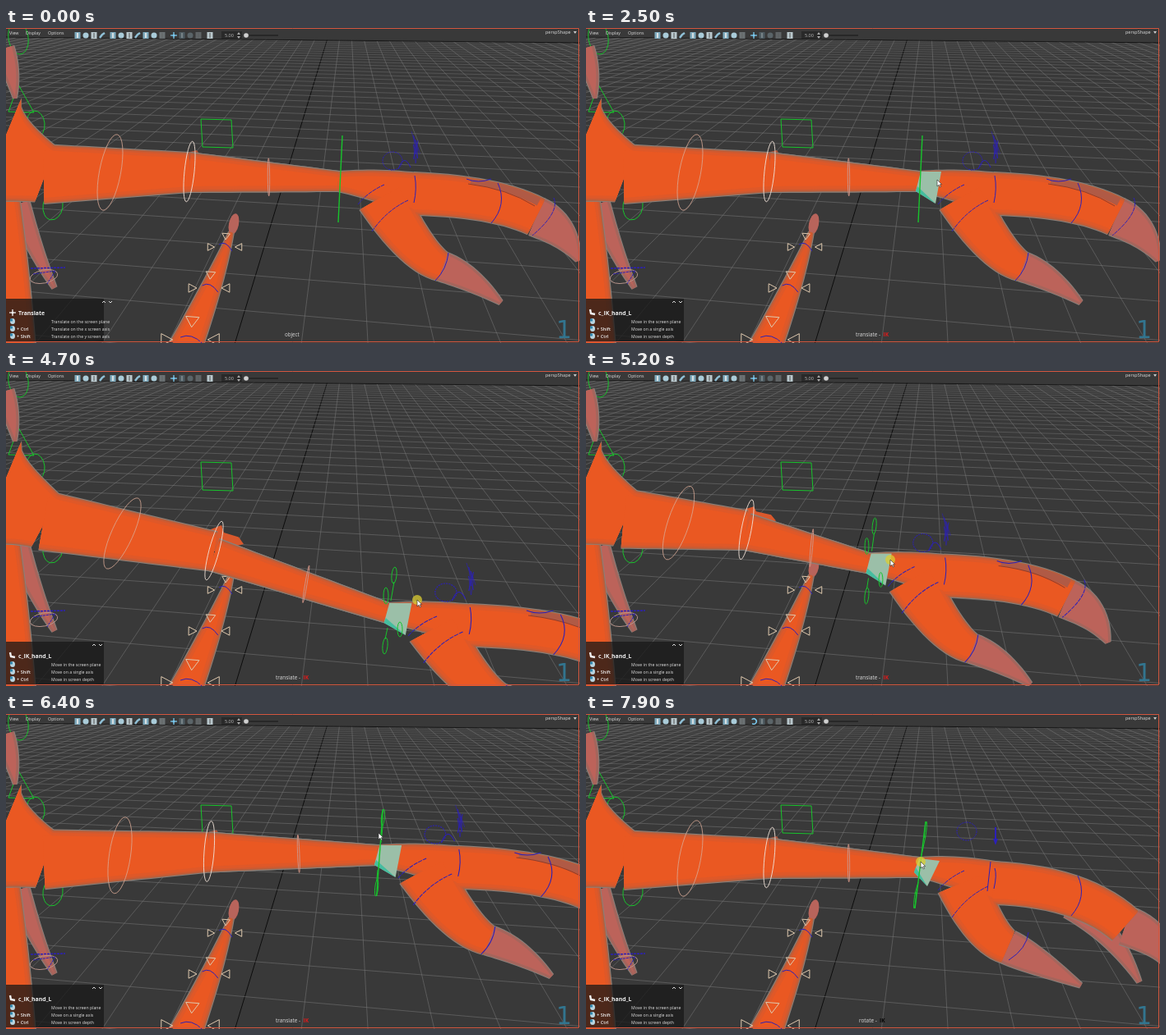
An HTML page with a canvas that plays this animation: 698x384 px, repeating every 8 s.

```html
<!DOCTYPE html>
<html lang="en">
<head>
<meta charset="utf-8">
<title>Rig viewport</title>
<style>
html, body { margin: 0; width: 100%; height: 100%; overflow: hidden; background: #393939; }
canvas { display: block; }
</style>
</head>
<body>
<canvas id="stage" width="698" height="384"></canvas>
<script>
const ctx = document.getElementById('stage').getContext('2d');
const W = 698, H = 384, LOOP = 8000, STEP = 100;
const GREEN = '#18c42c', BLUE = '#2c20b8';

// Growth of the outline and its colour, from the rim to the lit core.
const SKIN = [[1, '#88807b'], [0, '#b3603f'], [-1.5, '#d05a30'], [-3.5, '#df5828'], [-7, '#ea5822']];
const CLAW = [[1, '#88807b'], [0, '#a5655c'], [-3, '#bc635a']];

const lerp = (a, b, k) => a + (b - a) * k;
const clamp = k => Math.min(1, Math.max(0, k));
const ease = k => { k = clamp(k); return k * k * (3 - 2 * k); };

function trace(p, closed) {
  ctx.beginPath();
  for (let i = 0; i < p.length; i += 2) ctx.lineTo(p[i], p[i + 1]);
  if (closed) ctx.closePath();
}
function fill(p, color) {
  trace(p, true);
  ctx.fillStyle = color;
  ctx.fill();
}
function line(p, color, width = 1, closed = false) {
  trace(p, closed);
  ctx.strokeStyle = color;
  ctx.lineWidth = width;
  ctx.stroke();
}
function arc([x0, y0, cx, cy, x1, y1], color = BLUE, width = 1) {
  ctx.beginPath();
  ctx.moveTo(x0, y0);
  ctx.quadraticCurveTo(cx, cy, x1, y1);
  ctx.strokeStyle = color;
  ctx.lineWidth = width;
  ctx.stroke();
}
function oval(x, y, rx, ry, color, rot = 0, solid = false) {
  ctx.beginPath();
  ctx.ellipse(x, y, rx, ry, rot, 0, 7);
  ctx.lineWidth = 1;
  ctx.fillStyle = ctx.strokeStyle = color;
  solid ? ctx.fill() : ctx.stroke();
}
function text(s, x, y, size, color = '#ddd', weight = 400) {
  ctx.font = `${weight} ${size}px "Open Sans", sans-serif`;
  ctx.fillStyle = color;
  ctx.fillText(s, x, y);
}

// A limb: a quadratic spine whose half-width runs from w0 to w1.
const limb = (spine, w0, w1, power = 1) => ({ spine, w0, w1, power });
const bone = (x0, y0, x1, y1, w0, w1) => limb([x0, y0, (x0 + x1) / 2, (y0 + y1) / 2, x1, y1], w0, w1);

function fillLimb({ spine: [x0, y0, cx, cy, x1, y1], w0, w1, power }, color, grow = 0) {
  const left = [], right = [];
  for (let i = 0; i <= 14; i++) {
    const t = i / 14;
    const x = lerp(lerp(x0, cx, t), lerp(cx, x1, t), t);
    const y = lerp(lerp(y0, cy, t), lerp(cy, y1, t), t);
    const dx = lerp(cx - x0, x1 - cx, t), dy = lerp(cy - y0, y1 - cy, t);
    const k = Math.max(0, lerp(w0, w1, t ** power) + grow) / (Math.hypot(dx, dy) || 1);
    left.push(x + dy * k, y - dx * k);
    right.unshift(x - dy * k, y + dx * k);
  }
  fill([...left, ...right], color);
}
// Layer by layer over all limbs, so that joints show no seams.
function paint(limbs, layers) {
  for (const [grow, color] of layers) for (const l of limbs) fillLimb(l, color, grow);
}

// time, wrist x y, pointer x y
const KEYS = [
  [100, 416, 190, 640, 300],
  [900, 416, 190, 427, 185],
  [2700, 416, 190, 427, 185],
  [3800, 543, 192, 531, 187],
  [4700, 476, 298, 500, 279],
  [5700, 235, 177, 240, 181],
  [6400, 464, 175, 453, 145],
  [7000, 416, 190, 407, 180],
  [8000, 416, 190, 407, 180]
];
function poseAt(t) {
  let i = 0;
  while (i < KEYS.length - 2 && t >= KEYS[i + 1][0]) i++;
  const a = KEYS[i], b = KEYS[i + 1], k = ease((t - a[0]) / (b[0] - a[0]));
  const [, x, y, px, py] = a.map((v, n) => lerp(v, b[n], k));
  // The elbow sits halfway to the wrist until the arm is too short and folds.
  const mid = (30 + x) / 2, slack = Math.max(0, 195 - mid), fold = slack / 62;
  const bump = clamp((y - 195) / 100);
  return {
    x, y, px, py, fold, bump,
    ex: mid + slack,
    ey: (178 + y) / 2 - 8 - slack * .53 - bump * 10,
    loops: clamp(Math.hypot(x - 416, y - 190) / 110),
    matrix: [1 + Math.max(0, x - 416) * .0015 + .03 * fold, 0, -.24 * fold, 1 - .05 * fold, x, y]
  };
}

function drawGrid() {
  ctx.fillStyle = '#393939';
  ctx.fillRect(0, 0, W, H);
  const horizon = -70, cell = .178, top = 12;
  ctx.save();
  trace([0, 10, W, 18, W, H, 0, H], true);
  ctx.clip();
  for (let i = -36; i <= 32; i++) {
    const x = y => 416 + (i * cell - .303) * (y - horizon);
    line([x(top), top, x(H), H], i ? 'rgba(125,125,125,.5)' : '#0c0c0c');
  }
  // Rows are evenly spaced in depth, so their screen height follows 1 / depth.
  for (let n = 0; n < 58; n++) {
    const drop = 1 / (1 / 480 + n * cell / 640);
    const at = x => horizon + drop * (1 + (x - 391) / 4800);
    if (at(391) > 13) line([0, at(0), W, at(W)], `rgba(125,125,125,${Math.min(.5, .24 + drop / 800)})`);
  }
  ctx.restore();
  line([0, 11, W, 18], '#161616');
}

function drawBackdrop() {
  oval(15, 12, 12, 20, GREEN, -.15);
  line([3, 102, 15, 69, 34, 103], GREEN, 1, true);
  oval(36, 117, 11, 16, GREEN, -.1);
  oval(57, 217, 12, 17, GREEN, .15);
  line([237, 111, 274, 112, 276, 146, 239, 145], GREEN, 1, true);
  paint([limb([-2, 25, 8, 55, 11, 86], 12, 2, 1.8), limb([16, 214, 30, 262, 59, 317], 13, 3, 1.6)], CLAW);
  paint([limb([0, 205, 10, 290, 16, 390], 16, 20)], SKIN);
  oval(46, 303, 17, 8, '#b5938a', -.2);
  ctx.setLineDash([3, 1]);
  line([30, 293, 72, 292], BLUE, 1.5);
  line([33, 300, 60, 296, 50, 312], BLUE);
  ctx.setLineDash([]);

  oval(277, 239, 6, 13, '#b8645b', .2, true);
  paint([limb([274, 249, 256, 305, 218, 390], 3, 20)], SKIN);
  // Control rings: arrows left, above and right of the tail, facing it.
  for (const [x, y, size] of [[266, 267, 1], [247, 317, 1.2], [224, 380, 1.7]]) {
    arc([x - 7 * size, y - 3, x + size, y - 9, x + 9 * size, y + 5]);
    for (const side of [0, 1.65, 3.14]) {
      const ax = x - Math.cos(side) * 18 * size, ay = y - Math.sin(side) * 14 * size;
      const corners = [0, 2.1, 4.2].flatMap(a =>
        [ax + 5.5 * size * Math.cos(side + a), ay + 5 * size * Math.sin(side + a)]);
      line(corners, '#dfc9ae', 1, true);
    }
  }
}

function drawArm({ ex, ey, x, y, matrix, bump, fold }) {
  const [a, , c, d] = matrix;
  const wx = x - 11 * a - 3 * c, wy = y - 3 * d, sy = 178 + (ey - 176) * .1;
  const elbow = 24 - 3 * fold;
  const forearm = bone(ex, ey + 4 * bump, wx, wy, elbow - 4 * bump, 12);
  if (fold < .5) {
    const lift = 5 * bump;
    fill([ex - 12 - lift, ey - 22, ex + 9, ey - 27 - lift, ex + 12, ey - 23, ex + 30, ey - 20 + lift / 2,
      ex + 36, ey - 14 + lift, ex, ey], bump > .4 ? '#d9582c' : '#ad563d');
  }
  paint([forearm], SKIN);
  if (fold > 0) fillLimb(forearm, `rgba(120,75,68,${.65 * fold})`, 1);
  paint([
    limb([-10, 155, 19, 167, 48, sy], 75, 36, .5),
    bone(46, sy, ex, ey, 36, elbow),
    ...(fold < .4 ? [forearm] : [])
  ], SKIN);

  const tilt = Math.atan2(ey - 178, ex - 30);
  oval((30 + ex) / 2, (176 + ey) / 2, 13, 47, 'rgba(218,170,150,.8)', .2 + tilt * 1.2);
  oval(ex, ey - 1, 6, 37, 'rgba(240,225,215,.9)', .11 + tilt * .8);
  if (fold < .4) oval(lerp(ex, wx, .53), lerp(ey, wy, .53), 1.2, 23, '#cf9384', tilt * .9);
}

function drawHand(twist, selected) {
  const to = (a, b) => lerp(a, b, twist);
  const tipX = to(645, 656), tipY = to(230, 258);
  const thumbX = to(531, 513), thumbY = to(291, 284), thumbW = to(18, 21);

  if (twist > .1) {
    ctx.globalAlpha = clamp(twist * 2);
    paint([limb([590, 232, 640, 262, 673, 327], 18, 3, 1.6)], CLAW);
    ctx.globalAlpha = 1;
  }
  paint([
    limb([tipX, tipY, to(680, 705), to(245, 275), to(696, 712), to(284, 315)], 24, 3, 1.8),
    limb([thumbX, thumbY, to(565, 545), to(303, 299), 602, to(335, 331)], thumbW, 3, 1.8)
  ], CLAW);
  paint([
    limb([404, 187, 450, 190, 503, to(203, 207)], 12, 26),
    limb([495, to(202, 206), to(595, 602), to(205, 210), tipX, tipY], 26, 24),
    limb([457, 206, to(500, 485), to(280, 272), thumbX, thumbY], 31, thumbW)
  ], SKIN);
  if (twist < .5) {
    fillLimb(limb([565, 187, 610, 193, 648, 212], 3, 5), '#b05a45');
    arc([562, 190, 610, 196, 643, 217], '#8e3d2c');
  }
  if (selected) {
    const x0 = 407 - 2 * twist, x1 = 432 - 2 * twist, x2 = 425 - 10 * twist, x3 = 401 - 2 * twist;
    const y0 = 175 + twist, y2 = 214 - 4 * twist, y3 = 199 - 6 * twist;
    fill([x0, y0, x1, y0 + 3 * twist, x2, y2, x3, y3], '#9bbfa8');
    fill([x3, y3, x3 + 2, y3 - 6, x2, y2], '#45bd9f');
  }

  const drop = twist * 8;
  arc([497, 180 + drop, 500, 196, 496, 213]);
  arc([598, 189 + drop, 610, 215 + drop, 590, 238 + drop]);
  arc([538, 274 - drop, 536, 294 - drop, 522 - drop, 308 - drop]);
  ctx.setLineDash([5, 1]);
  arc([428, 215, 440, 200, 460, 191]);
  arc([445, 248, 463, 222, 489, 210]);
  if (twist < .5) arc([666, 207, 674, 224, 640, 253]);
  ctx.setLineDash([2, 1]);
  oval(to(470, 463), to(162, 143), 12, 11, BLUE);
  ctx.setLineDash([]);
  if (twist < .5) {
    const spikes = [];
    for (let i = 0; i < 12; i++) spikes.push(493 + (i * 5) % 8 + i * .3, 126 + (i * 17) % 40);
    line(spikes, BLUE, .6);
    arc([477, 172, 484, 152, 492, 170]);
    arc([560, 184, 574, 190, 590, 184]);
  } else {
    line([498, 138, 498, 158], BLUE, 2);
    fill([495, 152, 501, 152, 498, 160], BLUE);
    line([492, 180, 488, 216], BLUE);
  }
}

function drawWristControl({ x, y, loops, fold }, twist) {
  const reach = 1 - .25 * fold, lean = twist * 4 + loops * 3;
  const top = [x - 7 + lean, y - 59 * reach], foot = [x - 12 - lean, y + 47 * reach];
  if (loops < .6) line([...top, ...foot], GREEN, 1.4);
  if (loops < .05 && twist < .1) return;
  const r = 1 + 2 * loops;
  oval(top[0], top[1] + 10, r, 10, GREEN, .1);
  oval(foot[0], foot[1] - 10, r, 10, GREEN, .1);
  line([top[0], top[1] + 18, x - 8, y - 18], GREEN);
  line([foot[0], foot[1] - 18, x - 12, y + 15], GREEN);
  if (loops > .5) {
    oval(x - 14, y - 24, r, 10, GREEN);
    oval(x + 3, y + 17, r, 9, GREEN);
  }
}

function drawCross(x, y, color) {
  line([x - 4, y, x + 4, y], color, 1.3);
  line([x, y - 4, x, y + 4], color, 1.3);
  oval(x, y, 1.5, 1.5, color, 0, true);
}

function drawIcon(x, kind) {
  if (kind === 1) oval(x, 9, 3.5, 3.5, '#a9cbd8', 0, true);
  else if (kind === 3) line([x - 3, 12, x, 8, x + 3, 6], '#8fc0d6', 2.5);
  else {
    ctx.fillStyle = kind ? '#b9c8cd' : '#7eaabd';
    ctx.fillRect(x - 3.5, 5, 7, 8);
    line([x, 6, x, 12], kind ? '#555' : '#d8e0e2', kind ? 1 : 2);
  }
}

function drawToolbar(rotating) {
  text('View', 4, 8, 5.3);
  text('Display', 24, 8, 5.3);
  text('Options', 51, 8, 5.3);
  text('perspShape', 656, 7, 5.5);
  fill([690, 4, 694, 4, 692, 7], '#ccc');
  // start, count, opacity
  for (const [start, count, alpha] of [[87, 4, 1], [130, 6, 1], [190, 1, .4], [214, 3, .3], [248, 1, 1]]) {
    ctx.globalAlpha = alpha;
    for (let i = 0; i < count; i++) drawIcon(start + i * 10, count === 1 ? 2 : i % 4);
  }
  ctx.globalAlpha = 1;
  if (rotating) {
    ctx.beginPath();
    ctx.arc(204, 9, 3.2, -2.4, 2.2);
    ctx.strokeStyle = '#79c8ed';
    ctx.lineWidth = 1.5;
    ctx.stroke();
  } else drawCross(204, 9, '#79c8ed');
  ctx.fillStyle = '#292929';
  ctx.fillRect(262, 4, 25, 9);
  text('5.00', 266, 11, 5.5, '#bbb');
  fill([281, 8, 285, 8, 283, 5], '#aaa');
  fill([281, 10, 285, 10, 283, 13], '#aaa');
  line([296, 9, 331, 9], '#222', 1.5);
  oval(292, 9, 2.8, 2.8, '#d0d0d0', 0, true);
}

function drawPanel(selected) {
  ctx.fillStyle = 'rgba(24,24,24,.74)';
  ctx.fillRect(0, 330, 119, 52);
  const x = selected ? 107 : 119;
  line([x - 2, 335, x, 333, x + 2, 335], '#ddd');
  line([x + 6, 333, x + 8, 335, x + 10, 333], '#ddd');
  if (selected) line([5, 343, 6, 348, 11, 349], '#eee', 2.4);
  else drawCross(8, 347, '#eee');
  text(selected ? 'c_IK_hand_L' : 'Translate', 15, 349.5, 6.9, '#f0f0f0', 700);
  const rows = selected
    ? [['', 'Move in the screen plane'], ['+ Shift', 'Move on a single axis'], ['+ Ctrl', 'Move in screen depth']]
    : [['', 'Translate on the screen plane'], ['+ Ctrl', 'Translate on the x screen axis'],
      ['+ Shift', 'Translate on the y screen axis']];
  rows.forEach(([key, hint], i) => {
    const y = 357.5 + i * 9;
    oval(8, y, 3, 3.6, '#b9d4df', 0, true);
    ctx.fillStyle = '#2f86ad';
    ctx.fillRect(5, y - 3, 3, 3);
    text(key, 13, y + 2, 5.6, '#eee', 600);
    text(hint, 55, y + 2, 5.2, '#e2e2e2');
  });
}

function drawPointer(x, y, halo) {
  if (halo) oval(x, y, 6, 6, halo, 0, true);
  const arrow = [0, 0, 0, 8, 2, 6.3, 3.5, 9, 4.6, 8.4, 3.3, 5.8, 5.6, 5.6].map((v, i) => v + (i % 2 ? y : x));
  fill(arrow, '#fff');
  line(arrow, '#222', .6, true);
}

function draw(t) {
  const selected = t >= 1000, rotating = t >= 7000;
  const pose = poseAt(t), twist = ease((t - 7000) / 900);

  drawGrid();
  drawBackdrop();
  drawArm(pose);
  ctx.save();
  ctx.transform(...pose.matrix);
  ctx.translate(-416, -190);
  drawHand(twist, selected);
  ctx.restore();
  drawWristControl(pose, twist);

  drawToolbar(rotating);
  drawPanel(selected);
  if (selected) {
    text(rotating ? 'rotate -' : 'translate -', rotating ? 332 : 328, 376, 6.4);
    text('IK', rotating ? 357 : 361.5, 376, 6.6, rotating ? '#080808' : '#dd1c1c', 700);
  } else text('object', 339, 376, 6.2);
  ctx.font = '30px "DejaVu Sans", sans-serif';
  ctx.fillStyle = '#32758f';
  ctx.fillText('1', 669, 378);

  if (t >= 100) {
    const dragging = (t >= 2800 && t < 6100) || t >= 7200;
    const halo = t >= 5500 && t < 6100 ? 'rgba(240,150,30,.75)' : 'rgba(220,205,50,.75)';
    drawPointer(pose.px, pose.py, dragging && halo);
  }
  line([0, .5, 696.5, .5, 696.5, 382.5, 0, 382.5], '#d2563f');
}

ctx.lineJoin = 'round';
function tick() {
  draw(Math.floor(performance.now() % LOOP / STEP) * STEP);
  requestAnimationFrame(tick);
}
tick();
</script>
</body>
</html>
```
